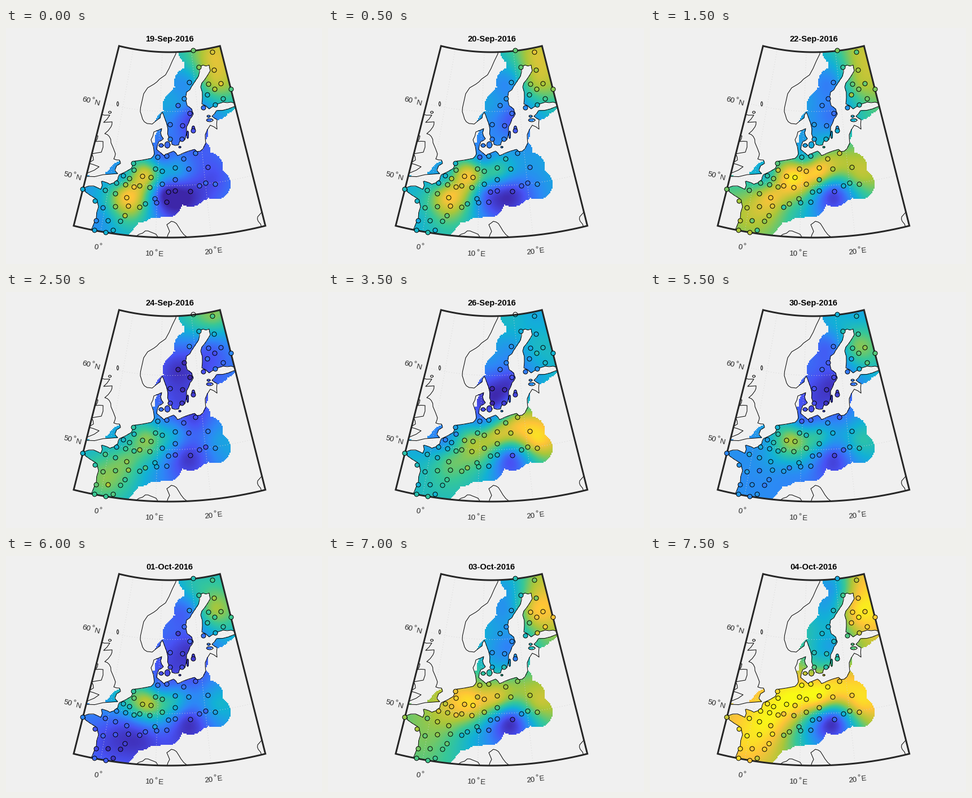
Animation, 560 px wide and 420 px high, one loop 8 s. Source, as a matplotlib script:

```python
import matplotlib.pyplot as plt
import numpy as np
from matplotlib.animation import FuncAnimation
from matplotlib.colors import LinearSegmentedColormap
from matplotlib.patches import PathPatch
from matplotlib.path import Path

W, H, DPI = 560, 420, 100
PX = 72 / DPI
FRAMES, INTERVAL = 16, 500
BG, INK = "#f0f0f0", "#262626"

plt.rcParams["font.family"] = "Liberation Sans"

PARULA = LinearSegmentedColormap.from_list("parula", [
    (.2422, .1504, .6603), (.2810, .3228, .9579), (.1786, .5289, .9682),
    (.0689, .6948, .8394), (.2161, .7843, .5923), (.6720, .7793, .2227),
    (.9970, .7659, .2199), (.9769, .9839, .0805)])
VMAX = 70
REACH = 27      # px around a station that gets coloured
CELL = 2        # px per field cell
SPREAD = 28     # px, correlation length of the field
SCATTER = 3.5   # deviation of a station from the field

# Conic projection in pixels
APEX = (289.8, -324)
R_SOUTH, PER_DEG, CONE, MID_LON = 697, 13.2, .806, 12.5
LON, LAT = (-5, 30), (43, 68)


def project(lon, lat):
    th = np.radians((np.asarray(lon, float) - MID_LON) * CONE)
    r = R_SOUTH - (np.asarray(lat, float) - LAT[0]) * PER_DEG
    return np.column_stack(np.broadcast_arrays(
        APEX[0] + r * np.sin(th), APEX[1] + r * np.cos(th)))


def distance(p, q):
    return np.hypot(*(p[:, None] - q[None]).transpose(2, 0, 1))


# Key points of the coasts; roughen() adds the small bends
NORTH_COAST = [
    (304, 30), (301, 46), (289, 72), (272, 91), (262, 100), (244, 117),
    (240, 135), (238, 149), (242, 162), (250, 170), (259, 171), (273, 160),
    (277, 150), (281, 160), (287, 180), (289, 196), (294, 207), (306, 208),
    (309, 200), (317, 199), (320, 176), (326, 162), (332, 153), (329, 144),
    (321, 138), (320, 114), (329, 104), (341, 86), (343, 70), (349, 66),
    (360, 66), (362, 76), (352, 92), (345, 105), (348, 124), (347, 135),
    (360, 144), (385, 132), (399, 132), (410, 134)]
SOUTH_COAST = [
    (410, 138), (394, 144), (373, 147), (365, 157), (374, 163), (374, 180),
    (362, 173), (353, 190), (354, 205), (349, 215), (338, 220), (334, 216),
    (313, 223), (304, 227), (297, 219), (280, 227), (267, 216), (271, 202),
    (279, 197), (274, 186), (276, 179), (262, 185), (257, 199), (263, 224),
    (257, 232), (228, 237), (222, 250), (201, 261), (198, 270), (184, 278),
    (175, 274), (169, 273), (168, 287), (155, 281), (139, 284), (140, 291),
    (158, 303), (164, 318), (160, 339), (153, 355), (148, 380)]
BRITAIN = [
    (120, 275), (142, 264), (172, 261), (198, 259), (193, 253), (203, 241),
    (201, 235), (191, 233), (194, 224), (186, 204), (183, 193), (175, 188),
    (186, 176), (188, 167), (173, 168), (184, 155), (165, 152), (140, 190),
    (163, 192), (159, 202), (172, 202), (172, 212), (169, 221), (152, 224),
    (155, 235), (144, 240), (165, 247), (147, 257), (120, 270)]
OPEN_COASTS = [
    [(228, 373), (236, 367), (247, 361), (256, 363), (266, 367), (270, 374)],
    [(285, 374), (290, 362), (285, 350), (293, 344), (302, 348), (310, 361),
     (322, 373)],
    [(457, 322), (446, 336), (447, 344), (453, 356)]]
# x, y, half width, half height
ISLANDS = [(332, 180, 3, 6), (322, 190, 1.5, 7), (275, 209, 4, 3.5),
           (286, 208, 5, 6), (308, 212, 2, 1.5), (361, 164, 6, 3),
           (359, 157, 3, 2), (198, 135, 1.5, 4), (184, 150, 2.5, 2)]

STATIONS = np.array([
    (332, 40), (366, 43), (342, 70), (369, 75), (325, 97), (359, 100), (381, 99),
    (370, 109), (399, 109), (357, 119), (385, 126), (316, 126), (305, 138),
    (371, 137), (350, 142), (326, 152), (291, 172), (313, 174), (332, 183),
    (291, 198), (312, 198), (336, 223), (315, 233), (285, 228), (269, 230),
    (226, 241), (227, 253), (265, 251), (277, 255), (300, 249), (324, 251),
    (358, 248), (208, 263), (219, 268), (242, 264), (257, 266), (300, 270),
    (196, 276), (212, 279), (227, 283), (237, 281), (255, 284), (277, 278),
    (288, 292), (300, 290), (327, 291), (343, 281), (354, 276), (371, 278),
    (136, 287), (176, 289), (194, 295), (214, 302), (158, 308), (172, 320),
    (194, 318), (217, 317), (237, 319), (247, 313), (264, 304), (267, 311),
    (285, 310), (211, 334), (160, 343), (181, 343), (203, 344), (157, 360),
    (177, 364), (190, 360)], float)

# Regional centres, north to south, and their level (0..70) on key days
CENTRES = np.array([
    (325, 55), (368, 45), (366, 98), (322, 97), (305, 138), (325, 160),
    (300, 195), (275, 232), (332, 228), (250, 260), (300, 255), (370, 265),
    (280, 292), (322, 292), (212, 298), (208, 268), (172, 335), (242, 316)], float)
LEVELS = {
    0: [40, 56, 51, 24, 24, 8, 16, 17, 14, 55, 27, 9, 2, 1, 60, 34, 26, 44],
    3: [33, 52, 48, 20, 20, 17, 28, 36, 50, 65, 62, 50, 44, 10, 58, 36, 52, 46],
    5: [36, 46, 14, 16, 3, 6, 8, 24, 8, 47, 27, 24, 25, 5, 45, 34, 47, 34],
    7: [32, 28, 32, 24, 16, 5, 4, 24, 54, 46, 54, 63, 42, 14, 42, 24, 35, 42],
    9: [20, 12, 40, 14, 10, 3, 6, 20, 28, 43, 42, 47, 40, 17, 58, 20, 48, 58],
    12: [34, 38, 48, 16, 12, 5, 6, 18, 14, 52, 33, 30, 26, 5, 12, 32, 8, 7],
    15: [26, 56, 64, 30, 31, 27, 40, 66, 64, 70, 66, 61, 36, 6, 68, 67, 64, 50]}


def kernel(p, q):
    d = distance(p, q) / SPREAD
    return (1 + d) * np.exp(-d)


def levels(day):
    return np.array([np.interp(day, list(LEVELS), col)
                     for col in zip(*LEVELS.values())])


def weather(day, at):
    z = levels(day)
    w = np.linalg.solve(kernel(CENTRES, CENTRES), z - z.mean())
    return np.clip(z.mean() + kernel(at, CENTRES) @ w, 0, VMAX)


def readings(day):
    noise = np.random.default_rng(day).normal(0, SCATTER, len(STATIONS))
    z = np.clip(weather(day, STATIONS) + noise, 0, VMAX)
    if 5 <= day <= 9:
        z[0] = np.nan   # northernmost station is silent
    return z


rng = np.random.default_rng(4)


def roughen(points, amount=.07):
    p = np.array(points, float)
    step = np.diff(p, axis=0)
    bend = rng.normal(0, amount, (len(step), 1)) * step[:, ::-1] * (1, -1)
    out = np.empty((2 * len(p) - 1, 2))
    out[::2] = p
    out[1::2] = p[:-1] + step / 2 + bend
    return out


def island(x, y, rx, ry):
    a = np.linspace(0, 2 * np.pi, 9)
    return np.column_stack([x + rx * np.cos(a), y + ry * np.sin(a)])


mainland = np.vstack([roughen(NORTH_COAST), roughen(SOUTH_COAST),
                      [(148, 420), (520, 420), (520, 0), (304, 0), (304, 30)]])
land = [mainland, roughen(BRITAIN)] + [island(*i) for i in ISLANDS]

arc = np.linspace(*LON, 80)
ring = np.vstack([project(arc, LAT[1]), project(arc[::-1], LAT[0])])
frame_path = Path(np.vstack([ring, ring[:1]]), closed=True)

gx, gy = np.meshgrid(np.arange(CELL / 2, W, CELL), np.arange(CELL / 2, H, CELL))
cells = np.column_stack([gx.ravel(), gy.ravel()])
near = distance(cells, STATIONS).min(axis=1) < REACH
on_land = np.any([Path(p).contains_points(cells) for p in land], axis=0)
mask = near & on_land & frame_path.contains_points(cells)

fig = plt.figure(figsize=(W / DPI, H / DPI), dpi=DPI, facecolor=BG)
ax = fig.add_axes([0, 0, 1, 1])
ax.axis("off")


def field(day):
    z = np.full(len(cells), np.nan)
    z[mask] = weather(day, cells[mask])
    return np.ma.masked_invalid(z.reshape(gx.shape))


def dot_colors(values):
    c = PARULA(np.nan_to_num(values) / VMAX)
    c[np.isnan(values), 3] = 0
    return c


image = ax.imshow(field(0), cmap=PARULA, vmin=0, vmax=VMAX, extent=(0, W, H, 0),
                  interpolation="nearest", aspect="auto")
ax.set(xlim=(0, W), ylim=(H, 0))


def grid_line(lon, lat):
    ax.plot(*project(lon, lat).T, color="#d4d4d4", lw=PX, ls=(0, (1, 3.5)), zorder=2)


for lon in (0, 10, 20):
    grid_line(lon, LAT)
for lat in (50, 60):
    grid_line(arc, lat)

ax.add_patch(PathPatch(frame_path, fc="none", ec=INK, lw=3 * PX,
                       joinstyle="miter", zorder=4))
for pts in land + [roughen(c) for c in OPEN_COASTS]:
    line, = ax.plot(*pts.T, color="black", lw=PX, zorder=3)
    line.set_clip_path(frame_path, ax.transData)

dots = ax.scatter(*STATIONS.T, s=(8 * PX) ** 2, ec="black", lw=PX, zorder=5)


def label(x, y, number, side, tilt):
    """Number, raised degree ring and letter along a tilted baseline."""
    c, s = np.cos(np.radians(tilt)), np.sin(np.radians(tilt))

    def at(along, up):
        return x + along * c - up * s, y - along * s - up * c

    style = dict(rotation=tilt, ha="center", va="center", size=13.33 * PX, color=INK)
    ax.text(*at(0, 0), number, **style)
    ax.text(*at(20, 0), side, **style)
    ax.plot(*at(3.7 * len(number) + 4, 8), "o", ms=3 * PX, mfc="none",
            mec=INK, mew=.7 * PX)


label(142, 129, "60", "N", -14)
label(109, 262, "50", "N", -14)
label(159.5, 391, "0", "", -10)
label(254.5, 402.5, "10", "E", -2)
label(359.5, 399, "20", "E", 6)
title = ax.text(290, 24, "", ha="center", va="baseline", weight="bold",
                size=14.67 * PX, color="black")


def update(day):
    date = 19 + day
    title.set_text(f"{date}-Sep-2016" if date <= 30 else f"{date - 30:02d}-Oct-2016")
    image.set_data(field(day))
    dots.set_facecolor(dot_colors(readings(day)))
    return image, dots, title


anim = FuncAnimation(fig, update, frames=FRAMES, interval=INTERVAL,
                     repeat=True, repeat_delay=0)
plt.show()
```
